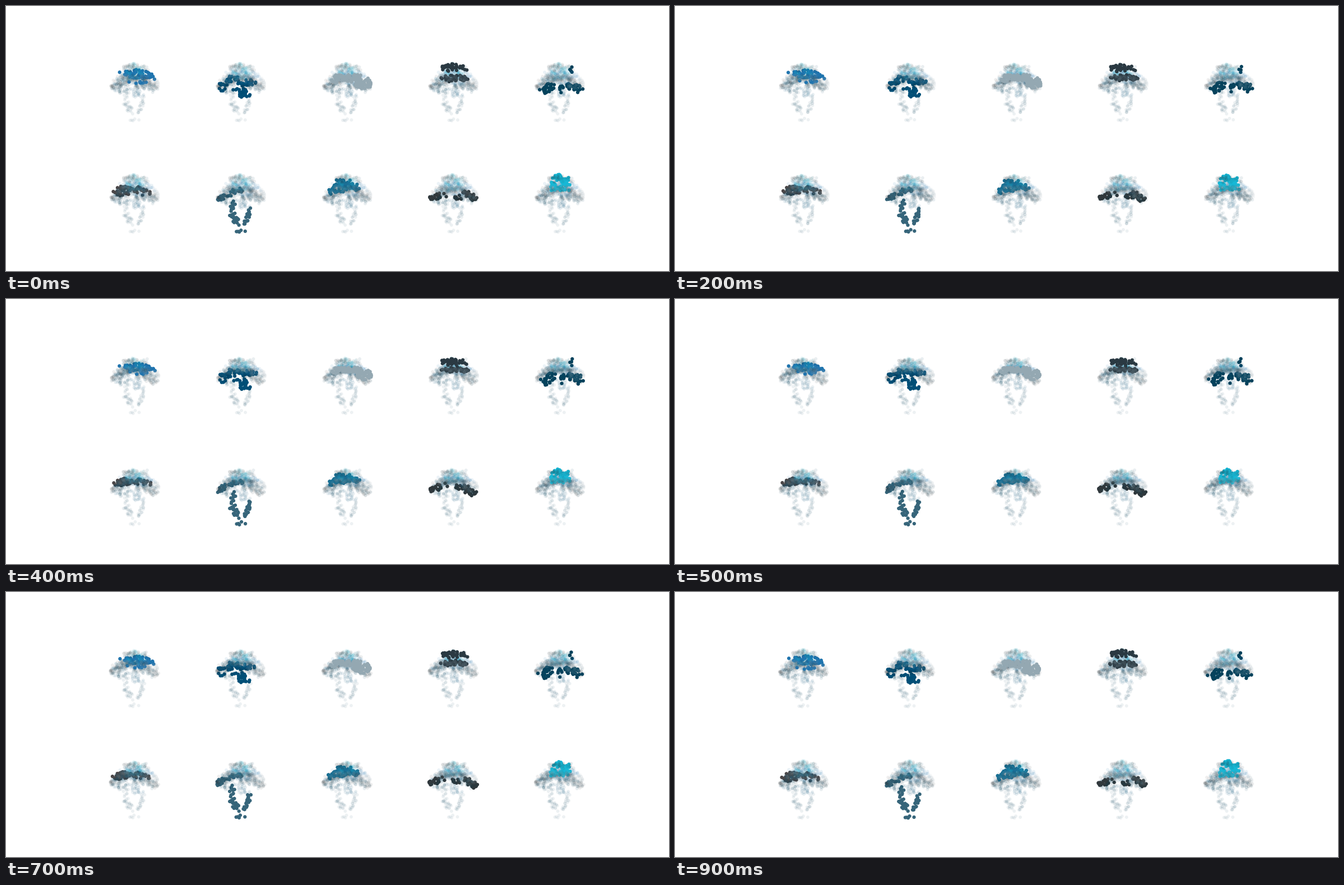
Recreate the animation shown at these times as a matplotlib script. Size 1183 by 473 pixels, loop 1000 ms.

```python
import matplotlib.pyplot as plt
import numpy as np
from matplotlib.animation import FuncAnimation
from matplotlib.colors import to_rgba

W, H, DPI = 1183, 473, 100
FRAMES, INTERVAL = 10, 100
COL_STEP, ROW_STEP = 189.6, 198.6
MID_X, HALF_W = 230, 46
DENSITY = 0.078
FAINT = 0.055

rng = np.random.default_rng(12)


def blob(x, y, a, b, tilt=0, side=1):
    """Dots (x, y, depth) in a tilted ellipse, a few straying past its rim."""
    n = round(DENSITY * np.pi * a * b)
    r = np.sqrt(rng.random(n)) * np.where(rng.random(n) < 0.1, 1.25, 1)
    angle = rng.uniform(0, 2 * np.pi, n)
    u, v = a * r * np.cos(angle), b * r * np.sin(angle)
    c, s = np.cos(np.radians(tilt)), np.sin(np.radians(tilt))
    px, py = x + u * c - v * s, y + u * s + v * c
    return np.column_stack([px, py, side * swell(px, py) + rng.normal(0, 0.6, n)])


def swell(x, y):
    """Depth of the dome: bulges at the brim, recedes at the crown and sides."""
    rim = np.sqrt(np.clip(1 - ((x - MID_X) / HALF_W) ** 2, 0, 1))
    return rim * np.interp(y, [100, 120, 142, 160], [-2.5, -0.5, 4, 0.5])


def cluster(color, *blobs):
    return color, np.vstack(blobs)


blue = cluster("#1f74ae", blob(236, 122, 28, 8, 8), blob(234, 136, 17, 2))
navy = cluster("#004f77", blob(197, 144, 6, 9, 20), blob(212, 130, 13, 5, -10, side=-1),
               blob(239, 137, 19, 6), blob(232, 155, 14, 8, 20))
silver = cluster("#94a8b2", blob(251, 134, 24, 12, 20), blob(214, 130, 14, 8))
charcoal = cluster("#2a3942", blob(230, 110, 23, 7), blob(231, 129, 28, 5.5))
deep = cluster("#05425c", blob(207, 147, 15, 8, -25), blob(257, 146, 15, 8, 20),
               blob(233, 148, 4, 7), blob(250, 113, 2.5, 7, side=-1))
brown = cluster("#4b4748", blob(209, 131, 18, 9, -8), blob(242, 132, 17, 6, 15))
slate = cluster("#36657a", blob(201, 142, 15, 5, -25), blob(222, 131, 13, 5, -10),
                blob(215, 157, 5, 7), blob(219, 180, 17, 6, 60),
                blob(240, 177, 16, 5, 110), blob(229, 203, 10, 2))
teal = cluster("#1a6f93", blob(218, 125, 25, 9, -25), blob(244, 124, 10, 7, 20),
               blob(220, 112, 20, 1.5))
graphite = cluster("#30383c", blob(203, 141, 17, 5.5, -10),
                   blob(258, 140, 15, 7, 20, side=-1), blob(239, 143, 8, 4))
cyan = cluster("#17b8d6", blob(231, 115, 18, 13), blob(233, 130, 27, 1.5))

panels = [blue, navy, silver, charcoal, deep, brown, slate, teal, graphite, cyan]
stack = [brown, navy, slate, teal, graphite, deep, blue, cyan, charcoal, silver]

cloud = np.vstack([pts for _, pts in stack])
base, depth = cloud[:, :2], cloud[:, 2:]

fig = plt.figure(figsize=(W / DPI, H / DPI), dpi=DPI, facecolor="white")
ax = fig.add_axes([0, 0, 1, 1])
ax.set_xlim(0, W)
ax.set_ylim(H, 0)
ax.axis("off")

dots = []
for i, shown in enumerate(panels):
    shift = np.array([i % 5 * COL_STEP, i // 5 * ROW_STEP])
    colors = [to_rgba(c[0], 1 if c is shown else FAINT) for c in stack for _ in c[1]]
    dots.append((ax.scatter(*(base + shift).T, s=9, c=colors, linewidths=1.5), shift))


def draw(frame):
    # The viewpoint circles once per loop; nearer points swing further.
    a = 2 * np.pi * frame / FRAMES
    moved = base + depth * [np.sin(a), np.cos(a) - 1]
    for dot, shift in dots:
        dot.set_offsets(moved + shift)
    return [dot for dot, _ in dots]


anim = FuncAnimation(fig, draw, frames=FRAMES, interval=INTERVAL, repeat=True,
                     repeat_delay=0)
plt.show()
```
